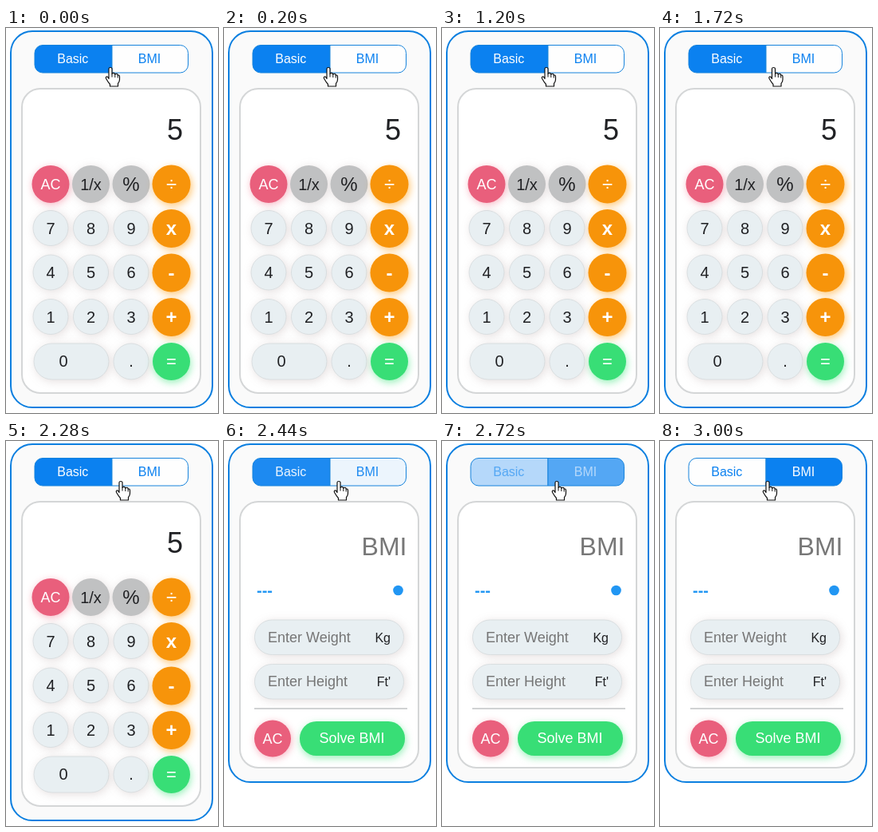
Write an HTML page that moves like this. It is 266 px wide and 482 px high and loops after 3.04 s.

```html
<!DOCTYPE html>
<html lang="en">
<head>
<meta charset="utf-8">
<title>Calculator tabs</title>
<style>
html, body { margin: 0; width: 100%; height: 100%; overflow: hidden; background: #fff; }
svg { display: block; width: 266px; height: 482px; }
text { font-family: "Liberation Sans", Arial, sans-serif; }
.key { filter: drop-shadow(2px 2px 6px rgba(125, 95, 95, .2)); }
.pink { filter: drop-shadow(1px 2px 5px rgba(238, 90, 120, .45)); }
.orange { filter: drop-shadow(2px 3px 5px rgba(255, 155, 10, .55)); }
.green { filter: drop-shadow(1px 3px 5px rgba(50, 225, 115, .5)); }
</style>
</head>
<body>
<svg id="stage" viewBox="0 0 266 482" xmlns="http://www.w3.org/2000/svg"></svg>
<script>
const LOOP = 3040, SWAP = 2360, FADE_START = 2340, FADE = 600;
const BLUE = [11, 129, 240], WHITE = [254, 254, 254];
const KEY = '#e8eff2', DARK = '#202124', PINK = '#e95f7c', ORANGE = '#f7940a', GREEN = '#38de76';
const stage = document.getElementById('stage');

function add(parent, tag, attrs, content) {
  const el = document.createElementNS('http://www.w3.org/2000/svg', tag);
  for (const name in attrs) el.setAttribute(name, attrs[name]);
  if (content) el.textContent = content;
  parent.appendChild(el);
  return el;
}
const group = (parent = stage) => add(parent, 'g', {});
const box = (parent, x, y, width, height, rx, fill, more = {}) =>
  add(parent, 'rect', { x, y, width, height, rx, fill, ...more });
const label = (parent, text, x, y, size, fill, anchor = 'middle', weight = 400) =>
  add(parent, 'text', { x, y, fill, 'font-size': size, 'text-anchor': anchor, 'font-weight': weight }, text);

function panel(parent, bottom, cardBottom) {
  box(parent, 6, 4, 253, bottom - 5, 27, '#fafafa', { stroke: '#0b7fe0', 'stroke-width': 2 });
  box(parent, 20, 76, 224, cardBottom - 77, 23, '#fff', { stroke: '#d4d6d7', 'stroke-width': 2 });
}
function round(parent, text, x, y, r, fill, glow, size, color, weight) {
  add(parent, 'circle', { cx: x, cy: y, r, fill, class: glow });
  label(parent, text, x, y + (size > 22 ? 8 : size > 18 ? 7 : 6), size, color, 'middle', weight);
}
function keyShape(parent, x, y, w, h) {
  box(parent, x, y, w, h, h / 2, KEY, { stroke: '#d9dee0', 'stroke-width': 1, class: 'key' });
}

function buildBasic() {
  const g = group();
  panel(g, 476, 458);
  label(g, '5', 222, 140, 36, DARK, 'end');
  const cols = [56, 106.5, 157], rows = [250.5, 306, 361.5];
  rows.forEach((y, r) => cols.forEach((x, c) => {
    keyShape(g, x - 22, y - 22, 44, 44);
    label(g, String(7 - 3 * r + c), x, y + 7, 20, DARK);
  }));
  keyShape(g, 35, 395, 94, 45);
  label(g, '0', 72, 424, 20, DARK);
  keyShape(g, 135, 395, 44, 45);
  label(g, '.', 157, 424, 20, DARK);
  round(g, 'AC', 56, 195.5, 23.5, PINK, 'pink', 18, '#fff');
  round(g, '1/x', 106.5, 195.5, 23.5, '#c0c1c2', 'key', 20, DARK);
  round(g, '%', 157, 195.5, 23.5, '#c0c1c2', 'key', 24, DARK);
  [['÷', 400], ['x', 700], ['-', 700], ['+', 700]].forEach(([sign, weight], i) =>
    round(g, sign, 207.5, 195.5 + 55.5 * i, 24, ORANGE, 'orange', 24, '#fff', weight));
  round(g, '=', 207.5, 417.5, 23.5, GREEN, 'green', 22, '#fff');
  return g;
}

function buildBmi() {
  const g = group();
  panel(g, 428, 410);
  label(g, 'BMI', 229.5, 143, 32, '#777', 'end');
  label(g, '---', 41, 194, 20, '#2196f3', 'start', 700);
  add(g, 'circle', { cx: 218.5, cy: 187, r: 6.3, fill: '#2196f3' });
  [['Enter Weight', 'Kg', 224], ['Enter Height', "Ft'", 279.5]].forEach(([hint, unit, y]) => {
    keyShape(g, 38.5, y, 187, 43.5);
    label(g, hint, 55, y + 27.5, 18, '#757575', 'start');
    label(g, unit, 209, y + 27.5, 16, DARK, 'end');
  });
  box(g, 38, 334, 192, 2, 0, '#d0d2d3');
  round(g, 'AC', 61, 372.5, 23, PINK, 'pink', 18, '#fff');
  box(g, 95, 351, 132, 43, 21, GREEN, { class: 'green' });
  label(g, 'Solve BMI', 160.5, 378, 18, '#fff');
  return g;
}

function buildTabs() {
  const g = group();
  const left = add(g, 'path', { d: 'M133 21.5H46a10 10 0 0 0-10 10V46a10 10 0 0 0 10 10H133Z' });
  const right = add(g, 'path', { d: 'M133 21.5H218.5a10 10 0 0 1 10 10V46a10 10 0 0 1-10 10H133Z' });
  for (const tab of [left, right]) tab.setAttribute('stroke', '#1683dc');
  return {
    left, right,
    leftText: label(g, 'Basic', 83.8, 44, 16),
    rightText: label(g, 'BMI', 180, 44, 16)
  };
}

const basic = buildBasic(), bmi = buildBmi(), tabs = buildTabs();
// Hand outline, with its fingertip near the local origin.
const hand = group();
add(hand, 'path', {
  d: 'M-2 12V1.5Q-2 0 0 0T2 1.5V8Q2.3 6.6 4 6.8T5.8 8.6Q6.5 7.4 8 7.9T9.2 9.6Q11.5 9 11.5 11.5V15Q11.5 18 9.5 20V23.5H-.5V21Q-2.8 18.5-5 14.5Q-6.4 12.3-5 11.5T-2 14Z',
  fill: '#fff', stroke: '#111', 'stroke-width': 1.2, 'stroke-linejoin': 'round'
});
add(hand, 'path', { d: 'M2 8V12M5.8 8.6V12.5M9.2 9.6V13', fill: 'none', stroke: '#111', 'stroke-width': 1 });

const clamp = v => Math.max(0, Math.min(1, v));
const smooth = v => v * v * (3 - 2 * v);
const mix = (a, b, p) => `rgb(${a.map((v, i) => Math.round(v + (b[i] - v) * p))})`;

// time, x, y
const path = [[0, 131, 49.5], [1400, 131, 49.5], [1700, 142.5, 49.5], [1960, 142.5, 49.5],
  [2200, 144, 50.5], [2800, 144, 50.5], [3000, 135, 50.5], [LOOP, 135, 50.5]];

function pointer(t) {
  const i = path.findIndex(p => p[0] > t);
  const a = path[i - 1], b = path[i];
  const p = smooth((t - a[0]) / (b[0] - a[0]));
  return [a[1] + (b[1] - a[1]) * p, a[2] + (b[2] - a[2]) * p];
}

function draw() {
  const t = performance.now() % LOOP;
  const swapped = t >= SWAP;
  basic.style.display = swapped ? 'none' : '';
  bmi.style.display = swapped ? '' : 'none';
  const p = smooth(clamp((t - FADE_START) / FADE));
  const off = mix(BLUE, WHITE, p), on = mix(WHITE, BLUE, p);
  tabs.left.setAttribute('fill', off);
  tabs.rightText.setAttribute('fill', off);
  tabs.right.setAttribute('fill', on);
  tabs.leftText.setAttribute('fill', on);
  hand.setAttribute('transform', `translate(${pointer(t)})`);
  requestAnimationFrame(draw);
}
draw();
</script>
</body>
</html>
```
